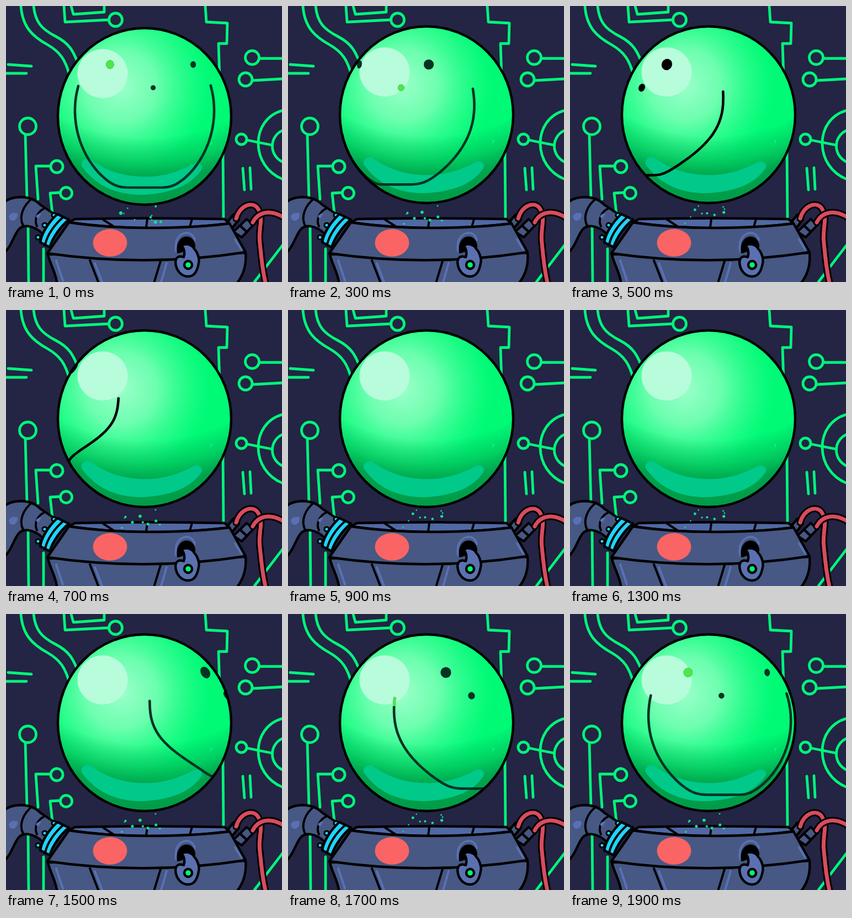
Write an HTML page that moves like this. It is 500x500 px and loops after 2 s.

```html
<!DOCTYPE html>
<html lang="en">
<head>
<meta charset="utf-8">
<title>Spinning robot head</title>
<style>
html, body { margin: 0; width: 100%; height: 100%; overflow: hidden; background: #242444; }
svg { display: block; width: 100%; height: 100%; }
.trace { fill: none; stroke: #00f77b; stroke-width: 4.8; }
.ink { stroke: #000; stroke-width: 4.4; }
.line { fill: none; stroke: #000; stroke-width: 4; }
.glow { fill: none; stroke: #5a70b4; stroke-width: 4; }
.metal { fill: #465883; }
.cable { fill: none; stroke: #000; stroke-width: 13; }
.cable.core { stroke: #d84c60; stroke-width: 7; }
</style>
</head>
<body>
<svg viewBox="0 0 500 500" stroke-linecap="round" stroke-linejoin="round">
  <defs>
    <radialGradient id="light" gradientUnits="userSpaceOnUse" cx="208" cy="143" r="162">
      <stop offset="0" stop-color="#9cffca"/>
      <stop offset=".4" stop-color="#80ffb9" stop-opacity=".85"/>
      <stop offset="1" stop-color="#40ff98" stop-opacity="0"/>
    </radialGradient>
    <radialGradient id="shade" gradientUnits="userSpaceOnUse" cx="256" cy="-100" r="460">
      <stop offset=".73" stop-color="#009a48" stop-opacity="0"/>
      <stop offset=".82" stop-color="#009a48" stop-opacity=".42"/>
      <stop offset=".89" stop-color="#009a48" stop-opacity=".9"/>
      <stop offset="1" stop-color="#009a48"/>
    </radialGradient>
    <clipPath id="inBall"><ellipse cx="251" cy="197" rx="159" ry="161"/></clipPath>
    <clipPath id="inShine"><path d="M152 60H228V167H152Z"/></clipPath>
  </defs>

  <rect width="500" height="500" fill="#242444"/>
  <g class="trace">
    <path d="M27 0C30 40 50 56 75 70S108 100 115 125M50 0C53 30 65 42 90 55S122 82 130 103"/>
    <path d="M105 0L107 29L187 25M118 0L122 15L178 11V0"/>
    <path d="M361 0L363 29L401 31L400 68L385 68L387 130M393 265L394 390"/>
    <path d="M460 95H500M446 135L500 132M437 243L482 252"/>
    <path d="M502 189C441 205 443 292 502 314M502 225C476 236 476 271 502 283"/>
    <path d="M429 294L432 333M442 293L444 332M4 106L46 109M0 122H37"/>
    <path d="M35 233L38 350M40 395L41 500M68 440V500M81 290H54L58 350M98 338L80 339L84 376M450 500L502 432"/>
    <circle cx="198.500" cy="25" r="12"/>
    <circle cx="446" cy="93.500" r="12.500"/>
    <circle cx="434" cy="133" r="12"/>
    <circle cx="426.500" cy="241.500" r="9.500"/>
    <circle cx="39.500" cy="218" r="15"/>
    <circle cx="92" cy="291" r="11"/>
    <circle cx="109" cy="339" r="10.500"/>
  </g>

  <!-- left arm -->
  <path class="ink metal" d="M-6 358C10 342 45 342 62 360L92 380L68 414C50 396 30 395 22 406C12 420 10 436 -6 450Z"/>
  <path class="line" d="M31 398C22 380 33 360 47 349M56 399C50 386 58 372 69 367"/>
  <path fill="#5a70b4" d="M5 380Q12 372 21 376Q22 385 14 389Q6 390 5 380ZM54 381Q60 374 64 377L58 386Z"/>
  <g class="ink" fill="#20d4ff">
    <g stroke-width="3">
      <circle cx="87" cy="379" r="4"/><circle cx="70" cy="397" r="4"/><circle cx="58" cy="419" r="4"/>
    </g>
    <path d="M93 377L114 387C100 398 85 418 79 437L62 428C65 410 78 391 93 377Z"/>
    <path class="line" stroke-width="3" d="M103 383C88 396 75 414 71 432"/>
  </g>

  <!-- right plugs and cables -->
  <path class="ink metal" d="M399 394L412 378L422 387L409 403ZM412 409L436 386L448 397L427 419ZM424 398L435 408"/>
  <g id="cables"></g>

  <!-- body -->
  <path class="ink metal" d="M76 450C80 470 90 480 93 505H416C429 490 436 470 434 447Z"/>
  <path class="glow" d="M161 466L174 500M291 466L281 500M91 461L103 497"/>
  <path class="line" d="M152 461L168 502M280 462L268 502"/>
  <path class="ink" fill="#5068a4" d="M114 392L125 386Q255 383 396 386L405 394Q260 412 114 392Z"/>
  <path class="line" d="M176 387L196 400M256 386L254 401M337 386L333 400"/>
  <path class="ink metal" d="M114 392Q180 402 260 402T405 394L434 446Q255 474 75 448Z"/>
  <path class="glow" d="M308 444C302 408 338 402 342 424M415 423L426 441"/>
  <path class="ink" d="M312 446C308 414 340 412 341 436Z"/>
  <path class="ink" fill="#5a70b0" d="M318 434C328 428 338 434 341 440C347 446 351 458 349 466C346 484 338 490 330 490C318 490 308 480 307 464C308 454 314 452 322 455C325 446 322 438 318 434Z"/>
  <circle class="ink" cx="330" cy="469" r="7" fill="#00f77b"/>
  <ellipse cx="188.500" cy="429" rx="31" ry="25" fill="#fb6464"/>

  <!-- head -->
  <g id="ball">
    <ellipse cx="251" cy="197" rx="157" ry="160" fill="#00fa76"/>
    <ellipse cx="251" cy="197" rx="157" ry="160" fill="url(#light)"/>
    <ellipse cx="251" cy="197" rx="157" ry="160" fill="url(#shade)"/>
    <ellipse cx="175" cy="119.500" rx="45.500" ry="44.500" fill="#b8fddb"/>
    <path fill="#00c98a" d="M137 287C135 276 146 270 155 276C185 299 225 308 262 306C295 304 318 294 340 283C350 279 358 286 354 294C335 322 300 336 250 339C205 340 165 326 137 287Z"/>
    <path d="M371 248L373 243" stroke="#4dffa0" stroke-width="1"/>
  </g>
  <g id="dark" clip-path="url(#inBall)"><g id="face"></g></g>
  <g id="lit" clip-path="url(#inShine)" color="#4be84a"><use href="#face"/></g>
  <ellipse id="rim" cx="251" cy="197" rx="157" ry="160" class="ink" fill="none"/>
  <g id="drips" fill="#12e08a"></g>
</svg>
<script>
const $ = id => document.getElementById(id);
const cx = 251, cy = 197, rx = 157, ry = 160;

const cables = [
  'M417 385C424 361 445 354 455 365C469 384 456 402 460 430C463 460 465 480 471 506',
  'M447 392C456 374 478 366 506 385'
];
$('cables').innerHTML = cables.map(d =>
  `<path class="cable" d="${d}"/><path class="cable core" d="${d}"/>`).join('');

function random(seed) {
  return () => (seed = (seed * 16807) % 2147483647) / 2147483647;
}

// Screen x of a point on the ball, from its longitude in degrees and its height.
function project(lon, y) {
  const radius = rx * Math.sqrt(1 - ((y - cy) / ry) ** 2);
  return cx + radius * Math.sin(lon * Math.PI / 180);
}

// A grin whose bottom swings ahead of its trailing corner; k counts steps from the front.
function mouth(k) {
  const bottom = 329 - 1.4 * k * k;
  const points = [];
  for (let i = 0; i <= 60; i++) {
    const a = Math.PI * i / 60, sin = Math.sin(a), cos = Math.cos(a);
    const trailing = cos > 0;
    const top = trailing ? 145 + 2.5 * k : 144;
    const y = top + (bottom - top) * sin;
    const swing = 9 * k + 0.5 * k * k + 9 * k * (trailing ? sin ** 3 : 1);
    const lon = 54 * Math.sign(cos) * Math.abs(cos) ** 0.3 - swing;
    if (lon < -90) break;
    points.push(project(lon, y).toFixed(1) + ' ' + y.toFixed(1));
  }
  return `<polyline points="${points}" fill="none" stroke="currentColor" stroke-width="4.6"/>`;
}

// Eyes and nose grow taller, narrower and more tilted as they turn away.
function spot(k, lon, y, size) {
  if (lon < -85) return '';
  const r = size + 0.7 * k;
  const width = r * Math.sqrt(Math.cos(lon * Math.PI / 180));
  return `<ellipse rx="${width}" ry="${r}" fill="currentColor"
    transform="translate(${project(lon, y)} ${y}) rotate(${6 * k})"/>`;
}

function face(k) {
  const turn = 11 * k + 1.3 * k * k;
  return mouth(k) + spot(k, -43 - turn, 106, 6) + spot(k, 29 - turn, 106, 7.7) +
    spot(k, -6 - 3 * k * k, 148, 4.6);
}

function drops(phase) {
  const rnd = random(phase * 977 + 41);
  let out = '';
  for (let i = 0; i < 10; i++) {
    const x = 208 + 78 * rnd(), y = 361 + 36 * rnd(), r = 1.3 + 1.9 * rnd() ** 3;
    out += `<circle cx="${x}" cy="${y}" r="${r}"/>`;
  }
  return out;
}

function draw(step) {
  const phase = step % 4;
  const lift = `translate(0 ${3 * Math.cos(phase * Math.PI / 2)})`;
  $('ball').setAttribute('transform', lift);
  $('rim').setAttribute('transform', lift);
  $('drips').innerHTML = drops(phase);

  // The return half mirrors the exit half.
  const leaving = step >= 1 && step <= 10;
  const k = leaving ? step - 1 : (20 - step) % 20;
  const front = leaving && k >= 4;
  $('face').innerHTML = k < 7 ? face(k) : '';
  $('face').setAttribute('transform', leaving ? '' : `translate(${2 * cx} 0) scale(-1 1)`);
  $('dark').setAttribute('color', front ? '#000' : '#053424');
  $('lit').setAttribute('visibility', front ? 'hidden' : 'visible');
}

const start = performance.now();
let shown = -1;
function tick() {
  const step = Math.floor((performance.now() - start) / 100) % 20;
  if (step !== shown) draw(shown = step);
  requestAnimationFrame(tick);
}
tick();
</script>
</body>
</html>
```
